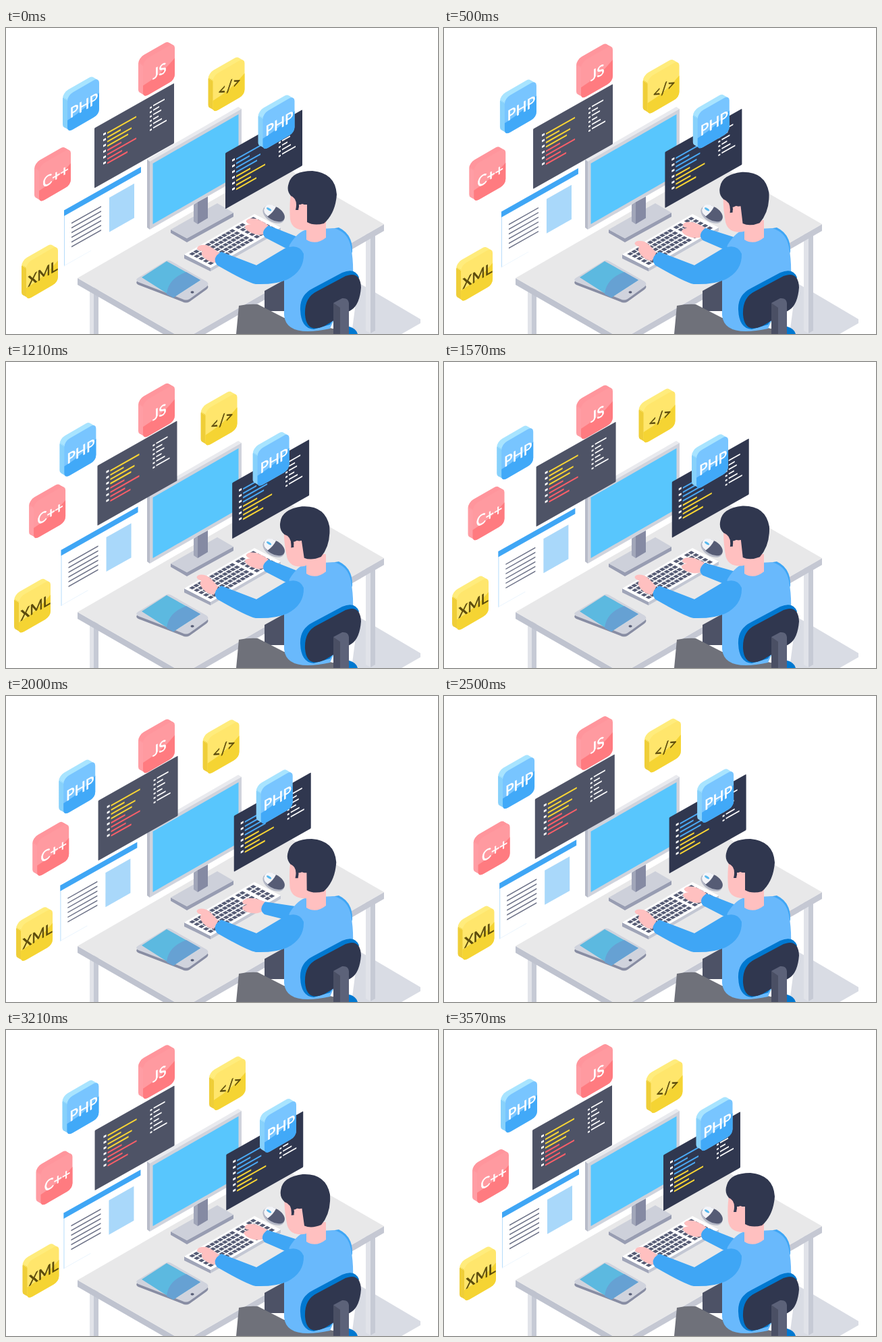
These frames come from a looping animation (640x454 px, 3640 ms). An HTML page:

```html
<!DOCTYPE html>
<html lang="en">
<head>
<meta charset="utf-8">
<title>Developer at a desk</title>
<style>
  html, body { margin: 0; height: 100%; overflow: hidden; background: #fff; }
  svg { display: block; width: 100vw; height: 100vh; }
  text { font: 21px Lato, sans-serif; text-anchor: middle; stroke-width: .6; }
</style>
</head>
<body>
<svg id="stage" viewBox="0 0 640 454"></svg>
<script>
const poly = (points, fill) => `<polygon points="${points}" fill="${fill}"/>`;
const path = (d, fill) => `<path d="${d}" fill="${fill}"/>`;
const rect = (x, y, w, h, fill, r = 0) =>
  `<rect x="${x}" y="${y}" width="${w}" height="${h}" rx="${r}" fill="${fill}"/>`;
const mover = (id, body) => `<g id="${id}">${body}</g>`;
const range = (n, f) => Array.from({ length: n }, (_, i) => f(i)).join('');

const ink = '#30374f', sleeve = '#3fa6f5', shirt = '#69b9fc', skin = '#ffc0c0';
const yellow = '#f9d534', edge = '#bfc3cf';

// top edge, left side, face, lower face, lettering
const palettes = {
  red: ['#ff959c', '#ff9da4', '#ff9aa0', '#ff7b80', '#fff'],
  blue: ['#a8e4ff', '#87d1fb', '#78c5ff', '#41a9f8', '#fff'],
  yellow: ['#ffec7c', '#efce38', '#ffe66c', '#f5d433', '#5a4a0c']
};

const gradients = Object.entries(palettes).map(([name, [top, side]]) =>
  `<linearGradient id="${name}" x2="0" y2="1"><stop offset=".14" stop-color="${top}"/>
   <stop offset=".16" stop-color="${side}"/></linearGradient>`).join('');

function tile(id, x, y, color, label) {
  const [, , face, lower, letters] = palettes[color];
  return mover(id, `<g transform="matrix(1 -.577 0 1 ${x + 7} ${y + 27.6})">
    ${range(4, i => rect(-7 + i * 2, -8 + i * 2.3, 47, 55, `url(#${color})`, 8))}
    ${rect(0, 0, 47, 55, face, 8)}
    ${path('M0 37Q28 36 47 23V47q0 8-8 8H8q-8 0-8-8Z', lower)}
    <text x="24.5" y="36.5" fill="${letters}" stroke="${letters}">${label}</text></g>`);
}

function codePanel(id, x, y, w, h, inset, fill, first, second) {
  const lengths = [43, 20, 36, 31, 21, 43, 22, 30];
  const notes = [17, 9, 12, 8, 13, 20];
  return mover(id, `<g transform="matrix(1 -.565 0 1 ${x} ${y})">
    ${rect(0, 0, w, h, fill, 1)}
    ${range(6, i => rect(inset, 15.5 + i * 8.6, 4, 3, '#fff'))}
    ${lengths.map((l, i) => rect(inset + 6, 17 + i * 6.4, l, 2.3, i < 4 ? first : second)).join('')}
    ${notes.map((l, i) => rect(inset + 69, 15.5 + i * 6.6, 3, 2.4, '#fff')
      + rect(inset + 74, 15 + i * 6.6, l, 2, '#fff')).join('')}</g>`);
}

const page = mover('page', `<g transform="matrix(1 -.565 0 1 86 270.5)">
  ${rect(0, 0, 114, 83, '#fff')}
  ${rect(0, 0, 1, 83, '#b5dcfb')}${rect(0, 82, 40, .7, '#e3f1fd')}
  ${rect(0, 0, 114, 8.5, sleeve)}
  ${range(6, i => rect(11, 24.5 + i * 7, 44, 1.7, '#6b7086'))}
  ${rect(67, 19, 37, 51, '#a9d8fa')}</g>`);

const desk = poly('522,378 548,393 614,432 614,438 586,454 512,454', '#d9dce4')
  + rect(124, 385, 6, 69, '#e1e3e9') + rect(130, 385, 7, 69, '#c6cad5')
  + path('M533 305H540V453L533 449Z', '#e1e3e9') + path('M540 305H547V449L540 453Z', '#c6cad5')
  + poly('106,371 264,462 264,472 106,381', edge)
  + poly('560,291 264,462 264,472 560,301', '#c5c8d3')
  + poly('106,371 402,200 560,291 264,462', '#e8e8e9');

const monitor = poly('244,299 268,312 337,274 337,280 268,318 244,304', '#989db2')
  + poly('244,299 313,260 337,274 268,312', '#cdd0da')
  + poly('278,262 284,258 284,291 278,287', '#a1a6b9')
  + poly('284,258 299,250 299,282 284,291', '#858aa3')
  + poly('209,195 344,117 349,120 213,198', '#e9eaee')
  + poly('209,195 213,198 213,299 209,296', '#b8bcc9')
  + poly('213,198 349,120 349,221 213,299', '#d0d3dc')
  + poly('217.5,201 344.5,128 344.5,218 217.5,291', '#58c6fd');

const keyRow = r => range(15, c => {
  const gap = c > 12 ? 7 : c > 10 ? 3 : 0;
  return rect(4 + c * 5.7 + gap, 8 + r * 17.5, 4.6, 12, '#565c75');
});
const keyboard = poly('264,336 303,356 303,361 264,342', '#a0a5b8')
  + poly('303,356 407,296 407,301 303,361', '#c3c7d3')
  + `<g transform="matrix(1.04 -.6 .39 .2 264 336)">${rect(0, 0, 100, 100, '#fff')}
     ${range(5, keyRow)}</g>`;

const mouse = `<g transform="translate(397.5 275) rotate(32)">
  <ellipse cy="2" rx="17.5" ry="11" fill="#b4b8c6"/><ellipse rx="17" ry="10" fill="#565c75"/>
  ${path('M-3-9.8Q-17-9-17 0Q-16 8-6 9Q-2 0-3-9.8', '#f3f4f8')}
  <ellipse cx="-10" cy="-1" rx="4" ry="1.6" fill="#58b9ee"/></g>`;

const slab = 'M195 371L236 346Q240 343 245 346L297 376Q302 380 297 384L272 402Q267 405 261 402L196 377Q191 374 195 371Z';
const tablet = `<g transform="translate(0 4)">${path(slab, '#888da3')}</g>` + path(slab, '#d0d3dd')
  + poly('201,370 238,346 288,374 248,400', '#5cb9e0')
  + path('M238 395Q240 372 267 362L288 374L248 400Z', '#66a1d3')
  + '<ellipse cx="276" cy="392" rx="2.5" ry="1.7" fill="#565c75"/>';

const rightArm = mover('rightArm',
  path('M389 293Q378 285 370 283Q357 281 356 287Q357 291 363 291Q353 292 354 296Q357 302 366 305Q376 309 384 305Z', skin)
  + path('M389 293L442 314L440 340L384 311Q376 302 389 293Z', sleeve));

const leftHand = mover('leftHand',
  path('M317 335Q306 325 297 322Q284 321 283 327Q284 330 291 331Q287 336 296 343Q304 349 313 348Z', skin));

const head = mover('head',
  path('M424 235Q419 256 421 284Q424 301 446 300L474 285L470 235Z', skin)
  + path('M429 270Q433 254 422 249Q415 241 419 230Q424 212 454 212Q488 215 490 247Q488 275 471 290Q456 294 446 288V262H434V270Z', ink)
  + '<ellipse cx="439" cy="271" rx="6" ry="10" fill="' + skin + '"/>');

const body = path('M412 374L383 390V420H412Z', '#4d5266')
  + path('M341 454L345 412Q360 409 373 410L412 430L520 454Z', '#6f717a')
  + rightArm
  + path('M470 300L493 296Q514 306 513 332L505 350Z', sleeve)
  + path('M412 358L420 322Q432 302 446 299L486 297Q507 303 511 325Q515 345 514 370L480 446Q415 460 412 426Z', shirt)
  + path('M445 285H474V311Q459 323 445 314Z', skin)
  + leftHand
  + path('M319 332L371 352L413 327Q434 319 441 335Q442 360 417 373Q400 381 370 380Q358 378 313 352Q304 341 319 332Z', sleeve)
  + head;

const chair = path('M505 442Q519 445 521 454H500Z', '#0078d0')
  + path('M436 418Q435 396 455 386L498 363Q517 355 523 370L480 440L456 447Q437 446 436 418Z', '#0078d0')
  + path('M443 425Q442 400 460 391L503 368Q525 360 526 385Q524 410 512 418L472 442Q445 454 443 425Z', ink)
  + path('M485 454V408L496 412V454Z', '#4a4f64')
  + path('M485 408L498 401Q507 400 508 408V454H495V415Z', '#5c6279');

document.getElementById('stage').innerHTML = `<defs>${gradients}</defs>`
  + desk + monitor + page
  + codePanel('darkPanel', 131, 148.5, 118, 89, 13, '#4e5366', yellow, '#fb5f68')
  + keyboard + mouse + tablet
  + codePanel('inkPanel', 325, 185.5, 114, 83, 10, ink, '#4aaaf6', yellow)
  + tile('js', 196, 21, 'red', 'JS') + tile('php', 84, 72.5, 'blue', 'PHP')
  + tile('cpp', 42, 177, 'red', 'C++') + tile('xml', 23, 321.5, 'yellow', 'XML')
  + tile('tag', 299.5, 43.5, 'yellow', '&lt;/&gt;') + tile('php2', 373.5, 99.5, 'blue', 'PHP')
  + body + chair;

// Elliptical drift: x cosine, x sine, y cosine, y sine
const round = [2.4, -5, -4.6, -3], loop = [4.9, -4.1, 3.1, 6];
const drifts = {
  js: [0, 0, -7, 0], php: [3, 0, -11.5, 0], cpp: round, php2: round, xml: loop, tag: loop,
  darkPanel: [-2.9, 0, -3.5, 0], inkPanel: [-6.6, 0, 4, 0], page: [2.9, 0, -5.5, 0]
};
const nod = [[0, 0], [10, 1], [18, 1], [30, 0], [35, 0], [44, 1], [50, 0]];
const reach = [[0, 0], [7, 4], [17, 0], [28, 13], [35, 0], [45, 4], [50, 0]];
const lift = [[0, 0], [8, 1], [32, 1], [45, 0], [50, 0]];

function keyed(keys, at) {
  const i = Math.max(1, keys.findIndex(k => k[0] >= at));
  const [t0, v0] = keys[i - 1], [t1, v1] = keys[i];
  return v0 + (v1 - v0) * (1 - Math.cos(Math.PI * (at - t0) / (t1 - t0))) / 2;
}

const place = (id, transform) => document.getElementById(id).setAttribute('transform', transform);
const start = performance.now();

function draw() {
  const ms = (performance.now() - start) % 3640;
  const step = Math.min(50, Math.floor((ms + 5) * 14 / 1000)); // 14 pictures a second
  const angle = step / 25 * Math.PI, c = Math.cos(angle) - 1, s = Math.sin(angle);
  for (const [id, [xc, xs, yc, ys]] of Object.entries(drifts))
    place(id, `translate(${xc * c + xs * s} ${yc * c + ys * s})`);
  const up = keyed(lift, step);
  place('head', `rotate(${-8.5 * keyed(nod, step)} 462 318)`);
  place('rightArm', `rotate(${-keyed(reach, step)} 440 322)`);
  place('leftHand', `translate(${-4 * up} ${-2 * up}) rotate(${11 * up} 315 342)`);
  requestAnimationFrame(draw);
}
draw();
</script>
</body>
</html>
```
